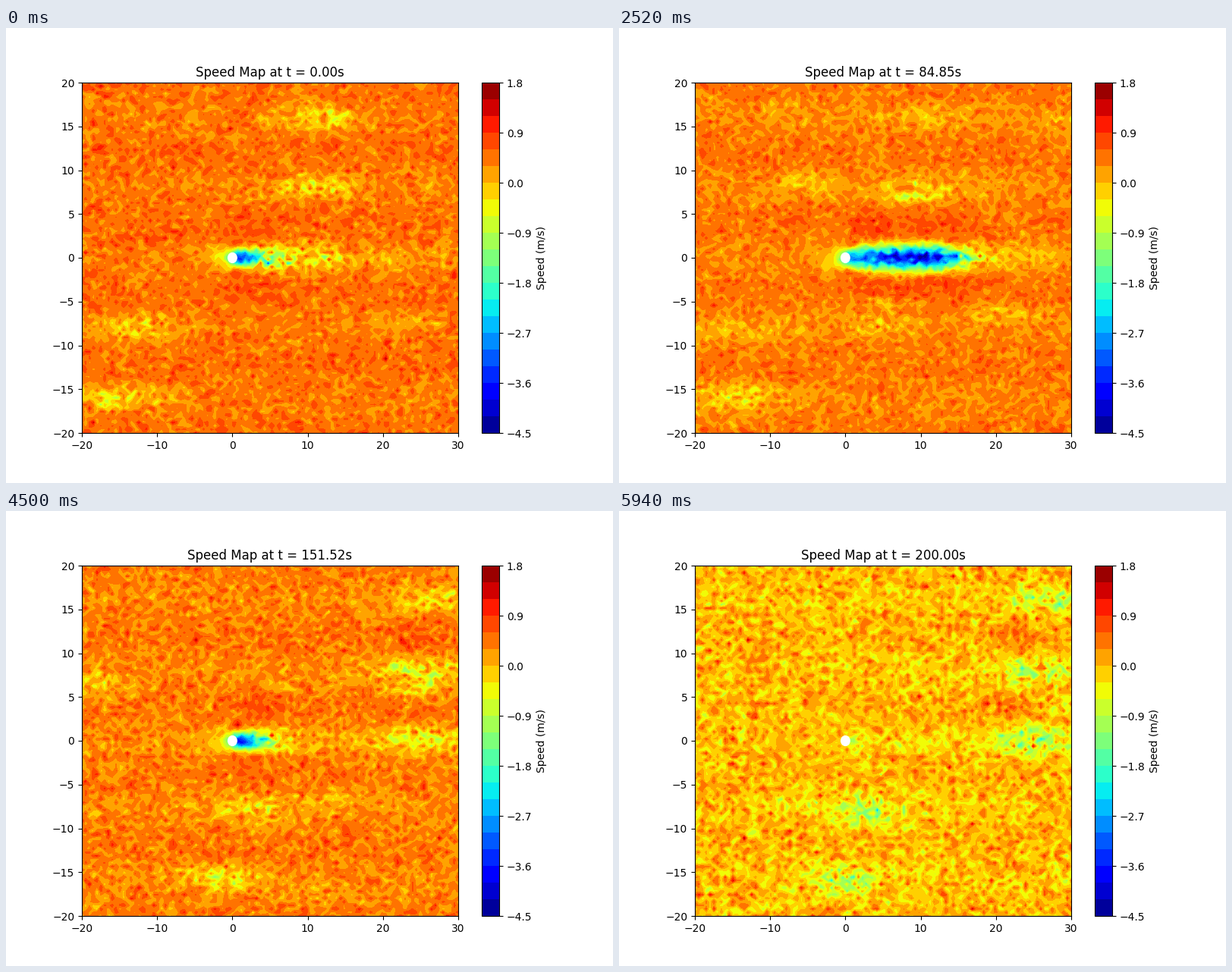
Write a matplotlib script that moves like this. It is 800x600 px and loops after 6 s.

```python
import numpy as np
import matplotlib.pyplot as plt
from matplotlib.animation import FuncAnimation
from matplotlib.patches import Ellipse

FRAMES, T_END, N = 100, 200.0, 100
LEVELS = np.arange(-15, 7) * 0.3
STEP = 22.0  # seconds between independent noise fields
rng = np.random.default_rng(11)
X, Y = np.meshgrid(np.linspace(-20, 30, N), np.linspace(-20, 20, N))
SIDE = np.abs(Y)

# Slow rows: height, centre early on, centre late
ROWS = [(16, 12, 27), (8, 11, 25), (0, 9, 25), (-8, -13, 3), (-16, -16, 0)]

GRAIN, MOTTLE = rng.standard_normal((2, 10, N, N))

# Short-lived streaks near the rows: x, y, time of peak
STREAKS = [(rng.uniform(-20, 30), rng.choice([-16, -7, 7, 16]) + rng.normal(),
            rng.uniform(0, T_END)) for _ in range(24)]


def blend(fields, t):
    """Unit-variance noise that changes gradually with time."""
    w = np.exp(-((t - STEP * np.arange(len(fields))) / STEP) ** 2)
    return np.tensordot(w / np.sqrt((w ** 2).sum()), fields, 1)


def sig(v):
    return 1 / (1 + np.exp(-np.clip(v, -40, 40)))


def bump(x, y, sx, sy):
    return np.exp(-((X - x) / sx) ** 2 - ((Y - y) / sy) ** 2)


def background(t, grain, rough):
    swing, aged = np.cos(2 * np.pi * t / 115), (t / T_END) ** 3
    early, late = sig((95 - t) / 18), sig((t - 130) / 18)
    mean = 0.36 + 0.05 * swing - 0.46 * sig((t - 183) / 7)
    sigma = 0.22 + 0.03 * swing + 0.17 * aged
    calm = 1 - 0.35 * bump(-1.5, 0, 4, 3)
    u = mean - 0.05 * np.cos(np.pi * Y / 4) + sigma * calm * grain

    for y, x_early, x_late in ROWS:
        u -= 0.55 * early * rough * bump(x_early, y, 6, 1.4)
        u -= (0.55 + 0.3 * aged) * late * rough * bump(x_late, y, 5, 1.6)
    for x, y, peak in STREAKS:
        life = np.exp(-((t - peak) / 28) ** 2)
        u -= 0.4 * life * rough * bump(x, y, 4, 1.2)
    for y in (4, 12):
        u += 0.45 * aged * late * bump(23, y, 5, 1.5)
    return u


def speed(t):
    grain, mottle = blend(GRAIN, t), blend(MOTTLE, t)
    rough = np.clip(1 + 0.9 * mottle, 0, None)
    u = background(t, grain, rough)

    # The wake grows steadily, then collapses
    length = min(3.5 + 0.135 * t, 1 + 15 * sig((138 - t) / 9))
    force = sig((182 - t) / 6)

    # Faster flow beside the wake and at the shoulders of the cylinder
    u += 0.28 * force * np.exp(-((SIDE - 3.3) / 1.9) ** 2) \
        * sig((X - 0.5) * 1.2) * sig((length + 1.5 - X) / 1.6)
    u += 0.5 * force * np.exp(-((X - 0.5) / 0.8) ** 2
                              - ((SIDE - 1.6) / 0.45) ** 2)

    # Slow flow ahead of the cylinder
    u -= force * (1.5 * bump(-0.4, 0, 0.9, 1.0) + 0.38 * bump(-2, 0, 2.6, 1.6))

    # Wake: tapered core, broken end and faint far strip
    down = np.clip(X, 0, None)
    width = 1.0 + 0.65 * min(1, length / 9) * (1 - np.exp(-down / 2.5))
    core = sig((X - 0.1) * 5) * sig((length - 0.5 * Y ** 2 - X) / 0.7) \
        * np.exp(-(SIDE / width) ** 2.8)
    axis = 0.72 + 0.28 * bump(0.6 * length, 0, 0.4 * length + 0.5, 0.6)
    u -= core * ((1.1 + 2.9 * force) * axis
                 + 0.38 * mottle * np.clip(X / 4, 0, 1))
    beyond = sig((X - length) / 0.7) * rough
    u -= beyond * (1.1 * force * bump(length, 0, 3.8, 1.3)
                   + 0.22 * np.exp(-(Y / 1.3) ** 2))
    return np.clip(u, -4.45, 1.75)


fig, ax = plt.subplots(figsize=(8, 6), dpi=100)


def draw_map(t):
    return ax.contourf(X, Y, speed(t), levels=LEVELS, cmap="jet")


contours = draw_map(0)
fig.colorbar(contours, ax=ax, label="Speed (m/s)")
ax.set_xlim(-20, 30)
ax.set_ylim(-20, 20)
ax.add_patch(Ellipse((0, 0), 1.3, 1.24, color="white", lw=0, zorder=2))


def update(i):
    global contours
    t = i * T_END / (FRAMES - 1)
    contours.remove()
    contours = draw_map(t)
    ax.set_title(f"Speed Map at t = {t:.2f}s")


anim = FuncAnimation(fig, update, frames=FRAMES, interval=60,
                     init_func=lambda: None, repeat=True, repeat_delay=0)
plt.show()
```
